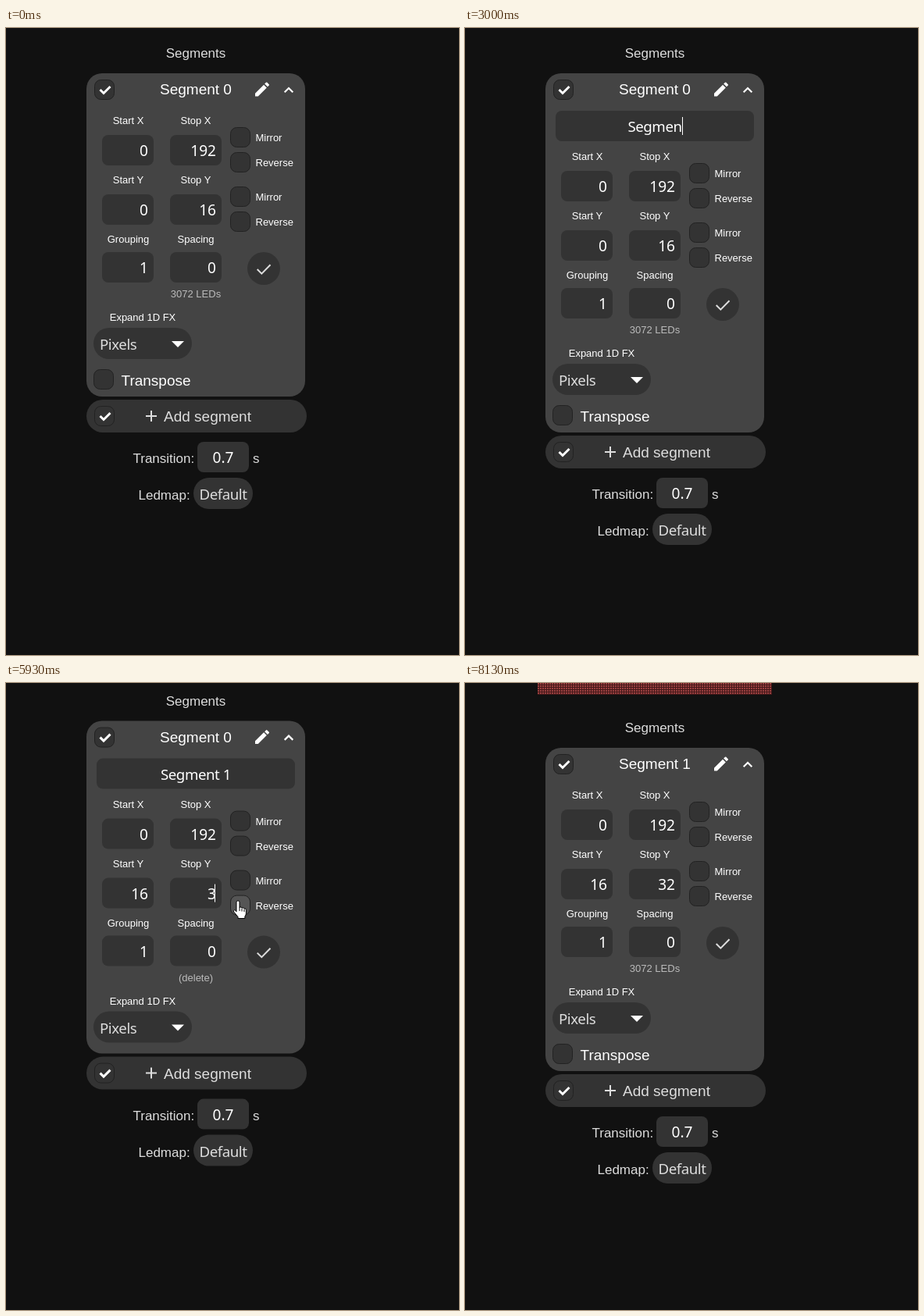
An HTML page that plays this animation: 580x803 px, repeating every 8940 ms.

```html
<!DOCTYPE html>
<html lang="en">
<head>
<meta charset="utf-8">
<title>Segment settings</title>
<style>
html, body { margin: 0; width: 100%; height: 100%; overflow: hidden; background: #111; }
svg { display: block; width: 580px; height: 803px; }
text { font-family: "Liberation Sans", Arial, sans-serif; fill: #fff; white-space: pre; }
.small { font-size: 13px; }
.mid { font-size: 17px; fill: #ddd; }
.big { font-size: 19px; }
.soft { fill: #ddd; }
.dim { fill: #bbb; }
.num { font: 19.1px "Noto Sans", sans-serif; }
.word { font: 18.7px "Noto Sans", sans-serif; letter-spacing: -.45px; }
</style>
</head>
<body>
<svg id="stage" viewBox="0 0 580 803"></svg>
<script>
const LOOP = 8940, STEP = 1000 / 15;
const stage = document.getElementById('stage');

// Pointer path: time, x, y. Gaps in TRIPS hide the pointer.
const TRIPS = [
  { until: 2270, keys: [[200, 574, 796], [470, 480, 640], [670, 375, 480], [870, 318, 250],
    [1070, 297, 83], [1200, 313, 80], [1330, 324, 76], [1470, 324, 76], [1870, 265, 149]] },
  { until: 5000, keys: [[3800, 240, 172], [3930, 175, 230], [4130, 175, 231],
    [4400, 180, 270], [4530, 183, 281], [4870, 160, 281]] },
  { until: 8130, keys: [[5200, 162, 281], [5400, 235, 279], [5530, 262, 279], [5800, 297, 279],
    [6270, 297, 279], [6470, 335, 320], [6600, 346, 385], [6730, 338, 392], [6870, 331, 381],
    [7670, 331, 381], [7870, 230, 520], [8000, 120, 680], [8066, 58, 766]] }
];
const NAME = 'Segment 1';
const KEY_TIMES = [2270, 2530, 2670, 2800, 2870, 2930, 3070, 3130, 3270];

let mouse;

function pointerAt(t) {
  const trip = TRIPS.find(p => t >= p.keys[0][0] && t < p.until);
  if (!trip) return null;
  const keys = trip.keys;
  const i = keys.findIndex(k => k[0] > t);
  if (i < 0) return keys[keys.length - 1].slice(1);
  const a = keys[i - 1], b = keys[i], f = (t - a[0]) / (b[0] - a[0]);
  return [a[1] + (b[1] - a[1]) * f, a[2] + (b[2] - a[2]) * f];
}

function stateAt(t) {
  const during = (a, b) => t >= a && t < b;
  return {
    title: t < 7470 ? 'Segment 0' : NAME,
    editing: during(1470, 7400),
    name: t < 2270 ? 'Segment 0' : NAME.slice(0, KEY_TIMES.filter(k => t >= k).length),
    nameSelected: t < 2270,
    nameCaret: during(2270, 3800) || during(4130, 4530),
    startY: t < 5000 ? '0' : t < 5130 ? '1' : '16',
    startMark: during(4730, 5000) ? 'sel' : during(5000, 5330) ? 'caret' : '',
    stopY: t < 5870 ? '16' : t < 6000 ? '3' : '32',
    stopMark: during(5470, 5870) ? 'sel' : during(5870, 6530) || during(7130, 7200) ? 'caret' : '',
    leds: t < 5070 || t >= 6070 ? '3072 LEDs' : t < 5200 ? '2880 LEDs' : '(delete)',
    removing: during(5200, 6070),
    shift: t < 5870 ? 0 : t < 6070 ? -9.4 : 25,
    preview: t >= 6070
  };
}

const inside = (x, y, w, h) => mouse && mouse[0] >= x && mouse[0] < x + w && mouse[1] >= y && mouse[1] < y + h;
const rect = (x, y, w, h, r, fill, more = '') =>
  `<rect x="${x}" y="${y}" width="${w}" height="${h}" rx="${r}" fill="${fill}" ${more}/>`;
const text = (x, y, s, cls, anchor = 'middle', id = '') =>
  `<text x="${x}" y="${y}" class="${cls}" text-anchor="${anchor}" ${id}>${s}</text>`;
const line = (d, color, width) =>
  `<path d="${d}" fill="none" stroke="${color}" stroke-width="${width}"/>`;
const button = (x, y, w, h) => rect(x, y, w, h, h / 2, inside(x, y, w, h) ? '#555' : '#333');

function checkbox(cx, cy, on) {
  const x = cx - 13, y = cy - 13;
  return rect(x + .5, y + .5, 25, 25, 8, inside(x, y, 26, 26) ? '#555' : '#333', 'stroke="#222"') +
    (on ? line(`M${cx - 5.5} ${cy}l4.5 4.5 8.5 -8.5`, '#fff', 3) : '');
}

function number(x, y, value, mark) {
  const w = value.length * 10.9, right = x + 59, top = y + 8;
  return rect(x, y, 66, 39, 8, '#333') +
    (mark === 'sel' ? rect(right - w, top, w, 23, 0, '#bbb') : '') +
    text(right, y + 27, value, 'num', 'end') +
    (mark === 'caret' ? rect(right - 2, top, 1, 23, 0, '#fff') : '');
}

function option(y, label) {
  return checkbox(300, y, false) + text(319.5, y + 5, label, 'small', 'start');
}

function header(s, y) {
  const hot = inside(308, y + 59, 40, 40);
  return checkbox(126, y + 79, true) + text(243, y + 85, s.title, 'big') +
    (hot ? `<circle cx="328" cy="${y + 79}" r="20" fill="#666"/>` : '') +
    `<path transform="translate(316 ${y + 66.5})" fill="#fff" d="M3 17.25V21h3.75L17.81 9.94l-3.75-3.75zM20.71 7.04a1 1 0 0 0 0-1.41l-2.34-2.34a1 1 0 0 0-1.41 0l-1.83 1.83 3.75 3.75z"/>` +
    line(`M356.7 ${y + 82.3}l5.3 -5.3 5.3 5.3`, '#fff', 2.2);
}

function nameField(s, y) {
  return rect(116, y + 106, 254, 39, 8, '#333') +
    `<rect id="mark" y="${y + 114}" height="23" width="0"/>` +
    text(243, y + 133, s.name, 'word', 'middle', 'id="name"');
}

function fields(s, y) {
  const label = (x, dy, str) => text(x, y + dy, str, 'small');
  const hot = mouse && Math.hypot(mouse[0] - 330, mouse[1] - y - 308) < 21;
  return label(156.5, 123, 'Start X') + label(243, 123, 'Stop X') +
    label(156.5, 199, 'Start Y') + label(243, 199, 'Stop Y') +
    label(156.5, 275, 'Grouping') + label(243, 275, 'Spacing') +
    number(123, y + 137, '0') + number(210, y + 137, '192') +
    number(123, y + 213, s.startY, s.startMark) + number(210, y + 213, s.stopY, s.stopMark) +
    number(123, y + 287, '1') + number(210, y + 287, '0') +
    option(y + 140, 'Mirror') + option(y + 172, 'Reverse') +
    option(y + 216, 'Mirror') + option(y + 248, 'Reverse') +
    `<circle cx="330" cy="${y + 308}" r="21" fill="${hot ? '#555' : '#333'}"/>` +
    line(`M321.7 ${y + 309}l5.6 5.6 11.2 -11.4`, '#ddd', 2) +
    text(243, y + 345, s.leds, 'small dim') + label(175, 375, 'Expand 1D FX') +
    button(112, y + 384, 126, 40) + text(120, y + 412, 'Pixels', 'word soft', 'start') +
    `<path d="M212 ${y + 401}h16l-8 8z" fill="#fff"/>` +
    (s.removing ? '' : checkbox(125, y + 450) + text(147.5, y + 458, 'Transpose', 'big', 'start'));
}

function footer(y) {
  return button(103, y + 476, 282, 42) + checkbox(126, y + 497, true) +
    line(`M179 ${y + 497}h14m-7 -7v14`, '#ddd', 2) +
    text(202, y + 504, 'Add segment', 'big soft', 'start') +
    text(162.5, y + 557, 'Transition:', 'mid', 'start') +
    rect(245, y + 530, 66, 39, 8, '#333') + text(278, y + 557, '0.7', 'num') +
    text(316, y + 557, 's', 'mid', 'start') +
    text(169.5, y + 604, 'Ledmap:', 'mid', 'start') +
    button(240, y + 576, 76, 40) + text(278, y + 604, 'Default', 'word soft');
}

function pointer(cardTop, cardHeight, foot) {
  if (!mouse) return '';
  const hand = inside(103, cardTop, 280, cardHeight) || inside(103, foot + 476, 282, 42) ||
    inside(240, foot + 576, 76, 40);
  const shape = hand
    ? '<path fill="#fff" d="M-2 1.8a2 2 0 0 1 4 0V8.2q2.6-.9 3 .8 2.5-.8 3 .9 2.3-.6 2.4 1.6V16q0 2-1.5 4V22.5H0V20.5L-5.2 14.2q-1.2-2 .8-2.4 1.2 0 2.4 2z"/><path fill="none" d="M2 8v5M5 9.5v4M8 10.5v3.5"/>'
    : '<path fill="#fff" d="M0 0V16.5L3.8 13 6.4 18.8 8.8 17.8 6.3 12H11.5z"/>';
  return `<g transform="translate(${mouse})" stroke="#000">${shape}</g>`;
}

// Marks the selection or caret once the typed text can be measured.
function markName(s) {
  const mark = document.getElementById('mark');
  if (!mark) return;
  const w = document.getElementById('name').getComputedTextLength();
  const set = (x, width, fill) => {
    mark.setAttribute('x', x);
    mark.setAttribute('width', width);
    mark.setAttribute('fill', fill);
  };
  if (s.nameSelected) set(243 - w / 2, w, '#bbb');
  else if (s.nameCaret) set(Math.round(243 + w / 2), 1, '#fff');
}

function render(t) {
  const s = stateAt(t + 5);
  mouse = pointerAt(t + 5);
  const top = s.shift, body = top + (s.editing ? 46 : 0), foot = body - (s.removing ? 34 : 0);
  const height = 414 + foot - top;
  stage.innerHTML =
    '<defs><pattern id="leds" width="3" height="3" patternUnits="userSpaceOnUse">' +
    rect(0, 0, 3, 3, 0, '#47191a') + rect(0, 0, 2, 2, 0, '#9a4040') + '</pattern></defs>' +
    rect(0, 0, 580, 803, 0, '#111') +
    (s.preview ? rect(93, 0, 300, 15, 0, 'url(#leds)') : '') +
    text(243, top + 38, 'Segments', 'mid') +
    rect(103, top + 58, 280, height, 20, '#444') +
    header(s, top) + (s.editing ? nameField(s, top) : '') + fields(s, body) + footer(foot) +
    pointer(top + 58, height, foot);
  markName(s);
}

let shown = -1;
function tick(now) {
  const step = Math.floor((now % LOOP + 5) / STEP);
  if (step !== shown) {
    shown = step;
    render(step * STEP);
  }
  requestAnimationFrame(tick);
}
render(0);
requestAnimationFrame(tick);
</script>
</body>
</html>
```
